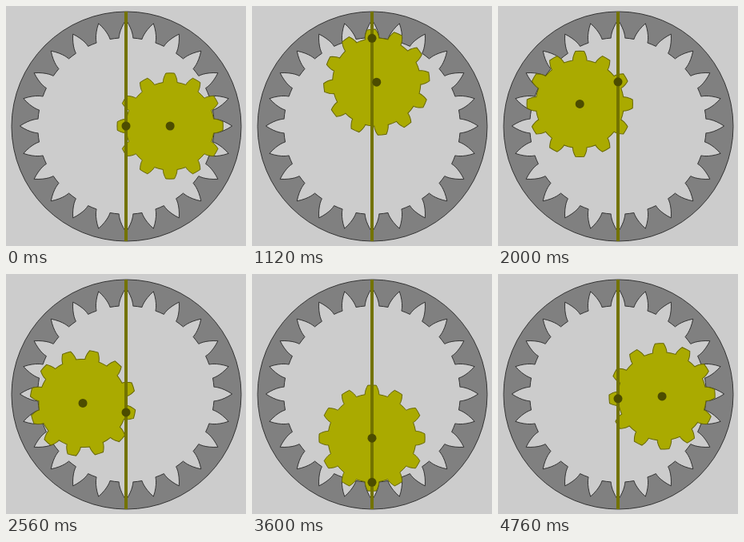
These frames come from a looping animation (300 px wide and 300 px high, 4800 ms). An HTML page:

```html
<!DOCTYPE html>
<html lang="en">
<head>
<meta charset="utf-8">
<title>Gear rolling inside a ring</title>
<style>
html, body { margin: 0; width: 100%; height: 100%; overflow: hidden; background: #ccc; }
svg { display: block; width: 100vw; height: 100vh; }
</style>
</head>
<body>
<svg viewBox="0 0 300 300">
  <g transform="translate(150 150)">
    <path id="ring" fill="#808080" fill-rule="evenodd" stroke="#333"/>
    <path id="gear" fill="#aa0" stroke="#660"/>
    <path d="M0-143V144" stroke="#737300" stroke-width="4"/>
    <circle id="hub" r="5.5" fill="#4c4c00"/>
    <circle id="pin" r="5.5" fill="#4c4c00"/>
  </g>
</svg>
<script>
const LOOP = 4800, STEP = 40;
const R = 55.15, RING = 2 * R, RIM = 143.5;
const $ = id => document.getElementById(id);

// Teeth with involute flanks standing on a base circle.
function toothPath(base, count, reach) {
  const half = 1.9 / count, steps = 8, pts = [];
  const add = (r, a) => pts.push((r * Math.cos(a)).toFixed(2) + ' ' + (r * Math.sin(a)).toFixed(2));
  for (let i = 0; i < count; i++) {
    const mid = i * 2 * Math.PI / count;
    for (let k = -steps; k <= steps; k++) {
      const t = reach * (1 - Math.abs(k) / steps);
      const off = Math.max(0, half - t + Math.atan(t));
      const r = base * Math.hypot(1, t);
      // k counts from the tip outwards, so walk each flank towards and away from it.
      pts.flank = k;
      if (k === 0) {
        add(r, mid - off);
        add(r, mid);
        add(r, mid + off);
      } else {
        add(r, mid + Math.sign(k) * off);
      }
    }
    add(base, mid + Math.PI / count);
  }
  return 'M' + pts.join('L') + 'Z';
}

const rim = `M${RIM + 0.5} .5a${RIM} ${RIM} 0 1 1 ${-2 * RIM} 0a${RIM} ${RIM} 0 1 1 ${2 * RIM} 0Z`;
$('ring').setAttribute('d', rim + toothPath(RING, 24, 0.668));
$('gear').setAttribute('d', toothPath(R, 12, 0.663));

function draw(ms) {
  const turn = Math.floor(ms % LOOP / STEP) * STEP / LOOP;
  const a = turn * 2 * Math.PI;
  const x = R * Math.cos(a), y = -R * Math.sin(a);
  $('gear').setAttribute('transform', `translate(${x} ${y}) rotate(${turn * 360})`);
  $('hub').setAttribute('cx', x);
  $('hub').setAttribute('cy', y);
  $('pin').setAttribute('cy', 2 * y);
}

let start;
function tick(now) {
  start ??= now;
  draw(Math.max(0, now - start));
  requestAnimationFrame(tick);
}
draw(0);
requestAnimationFrame(tick);
</script>
</body>
</html>
```
